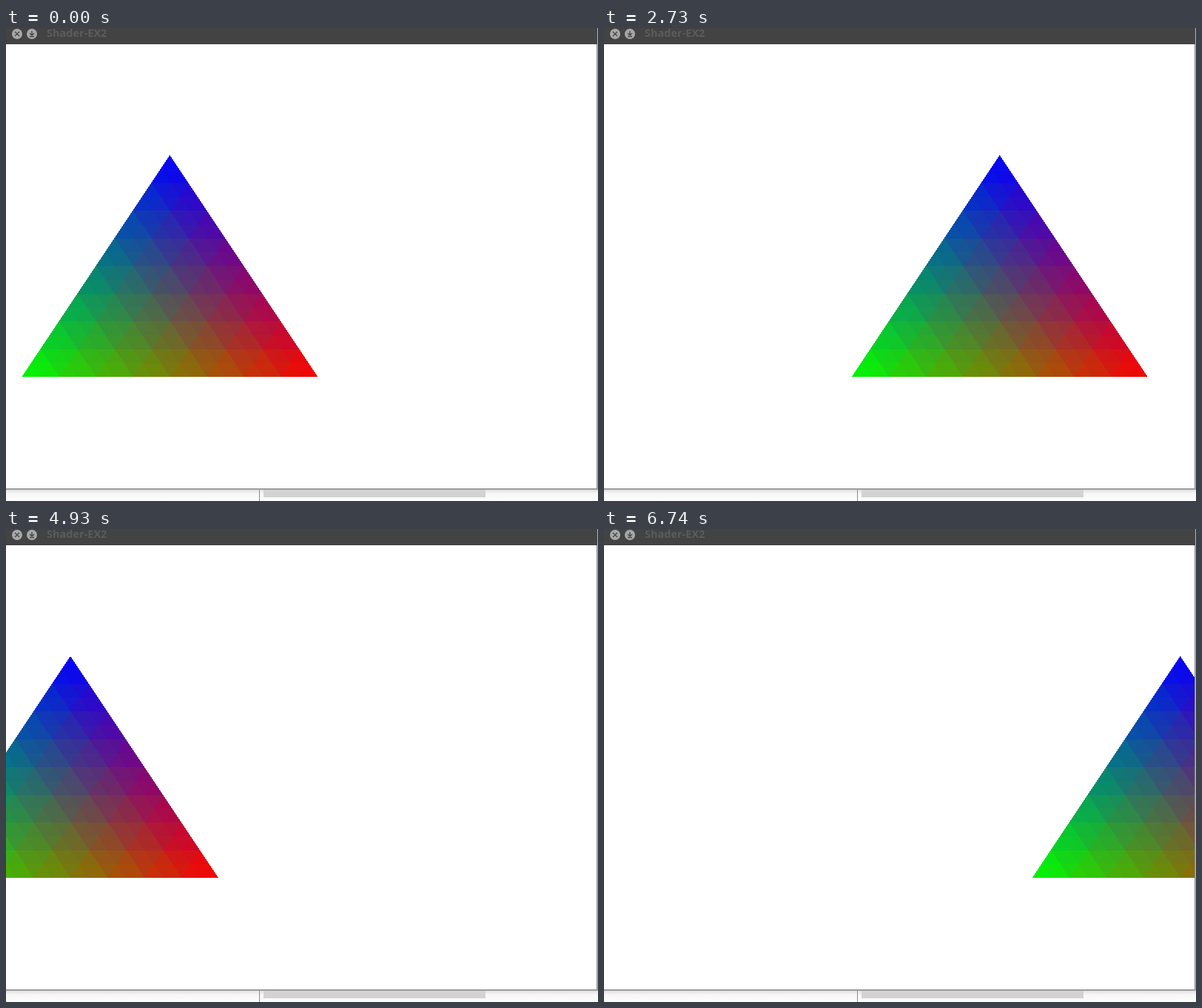
Animation, 800 px wide and 640 px high, one loop 6.84 s. Source, as an HTML page with a canvas:

```html
<!DOCTYPE html>
<html lang="en">
<head>
<meta charset="utf-8">
<title>Shader</title>
<style>
html, body { margin: 0; width: 100%; height: 100%; overflow: hidden; background: #fff; }
canvas { position: absolute; left: 0; top: 0; display: block; }
#title {
  position: absolute; left: 55px; top: -1px;
  font: bold 14.5px/16px "Open Sans", sans-serif;
  color: #5c5c5c; white-space: nowrap;
}
</style>
</head>
<body>
<canvas id="stage" width="800" height="640"></canvas>
<div id="title">Shader-EX2</div>
<script>
const LOOP = 6840, LAST = 168;
const W = 400, H = 300, TOP = 172, EDGE = 798;
const ctx = document.getElementById('stage').getContext('2d');

function rect(color, x, y, w, h) {
  ctx.fillStyle = color;
  ctx.fillRect(x, y, w, h);
}

// Mean barycentric weights of the small triangle that holds a point
function cellMean(weights, n) {
  const low = weights.map(c => Math.floor(c * n));
  const rest = (n - low[0] - low[1] - low[2]) / 3;
  return low.map(i => (i + rest) / n);
}

// Colour field of the triangle; its outline is cut when it is drawn
function makeField() {
  const c = document.createElement('canvas');
  c.width = W + 2;
  c.height = H;
  const g = c.getContext('2d');
  const img = g.createImageData(c.width, H);
  for (let y = 0; y < H; y++) {
    const blue = 1 - (y + 0.5) / H;
    for (let x = 0; x < c.width; x++) {
      const u = (x + 0.5) / W - blue / 2;
      const red = Math.min(1 - blue, Math.max(0, u));
      const rgb = [red, Math.max(0, 1 - blue - red), blue];
      const coarse = cellMean(rgb, 8), fine = cellMean(rgb, 16);
      const at = (y * c.width + x) * 4;
      for (let k = 0; k < 3; k++) img.data[at + k] = 127.5 * (coarse[k] + fine[k]);
      img.data[at + 3] = 255;
    }
  }
  g.putImageData(img, 0, 0);
  return c;
}

function button(x, strokes) {
  ctx.fillStyle = '#a8a8a8';
  ctx.beginPath();
  ctx.arc(x, 8, 7, 0, Math.PI * 2);
  ctx.fill();
  ctx.strokeStyle = '#484848';
  ctx.lineWidth = 1.4;
  ctx.beginPath();
  for (const [x1, y1, x2, y2] of strokes) {
    ctx.moveTo(x + x1, 8 + y1);
    ctx.lineTo(x + x2, 8 + y2);
  }
  ctx.stroke();
}

function drawWindow() {
  rect('#fff', 0, 0, 800, 640);
  rect('#434343', 0, 0, 799, 22);
  rect('#888', 798, 22, 1, 602);
  rect('#b4b4b4', 799, 0, 1, 624);

  const shade = ctx.createLinearGradient(0, 625, 0, 640);
  shade.addColorStop(0, '#e2e2e2');
  shade.addColorStop(0.35, '#f7f7f7');
  shade.addColorStop(1, '#fdfdfd');
  rect(shade, 0, 625, 800, 15);
  rect('#d3d3d3', 348, 625, 300, 10);
  rect('#8c8c8c', 342, 625, 1, 15);
  rect('#848484', 0, 623, 799, 1);
  rect('#b0b0b0', 0, 624, 800, 1);

  button(15, [[-3, -3, 3, 3], [3, -3, -3, 3]]);
  button(35, [[0, -4, 0, 2], [-3, -1, 0, 2], [3, -1, 0, 2], [-3, 3.5, 3, 3.5]]);
}

// Steps last 40 ms, two of them 50 ms, and the last one is held
function stepAt(t) {
  const late = (t >= 370 ? 10 : 0) + (t >= 6140 ? 10 : 0);
  return Math.min(LAST, Math.floor((t - late) / 40));
}

// The scene ticks 60 times a second and is sampled about 21 times, with a slow drift
function phaseAt(step) {
  const drift = 0.72 * Math.sin(2 * Math.PI * step / LAST);
  return Math.floor(step * 60 / 21 + drift + 0.6) / 60 - 0.457;
}

const field = makeField();
drawWindow();

function draw(t) {
  const left = 198 + 400 * Math.sin(phaseAt(stepAt(t)));
  ctx.save();
  ctx.beginPath();
  ctx.rect(0, TOP, EDGE, H);
  ctx.clip();
  rect('#fff', 0, TOP, EDGE, H);
  for (let y = 0; y < H; y++) {
    const inset = W / 2 * (1 - (y + 0.5) / H);
    const x = Math.round(left + inset);
    const w = Math.round(left + W - inset) - x;
    if (w > 0) ctx.drawImage(field, Math.floor(inset), y, w, 1, x, TOP + y, w, 1);
  }
  ctx.restore();
}

const start = performance.now();
function tick() {
  draw((performance.now() - start) % LOOP);
  requestAnimationFrame(tick);
}
tick();
</script>
</body>
</html>
```
